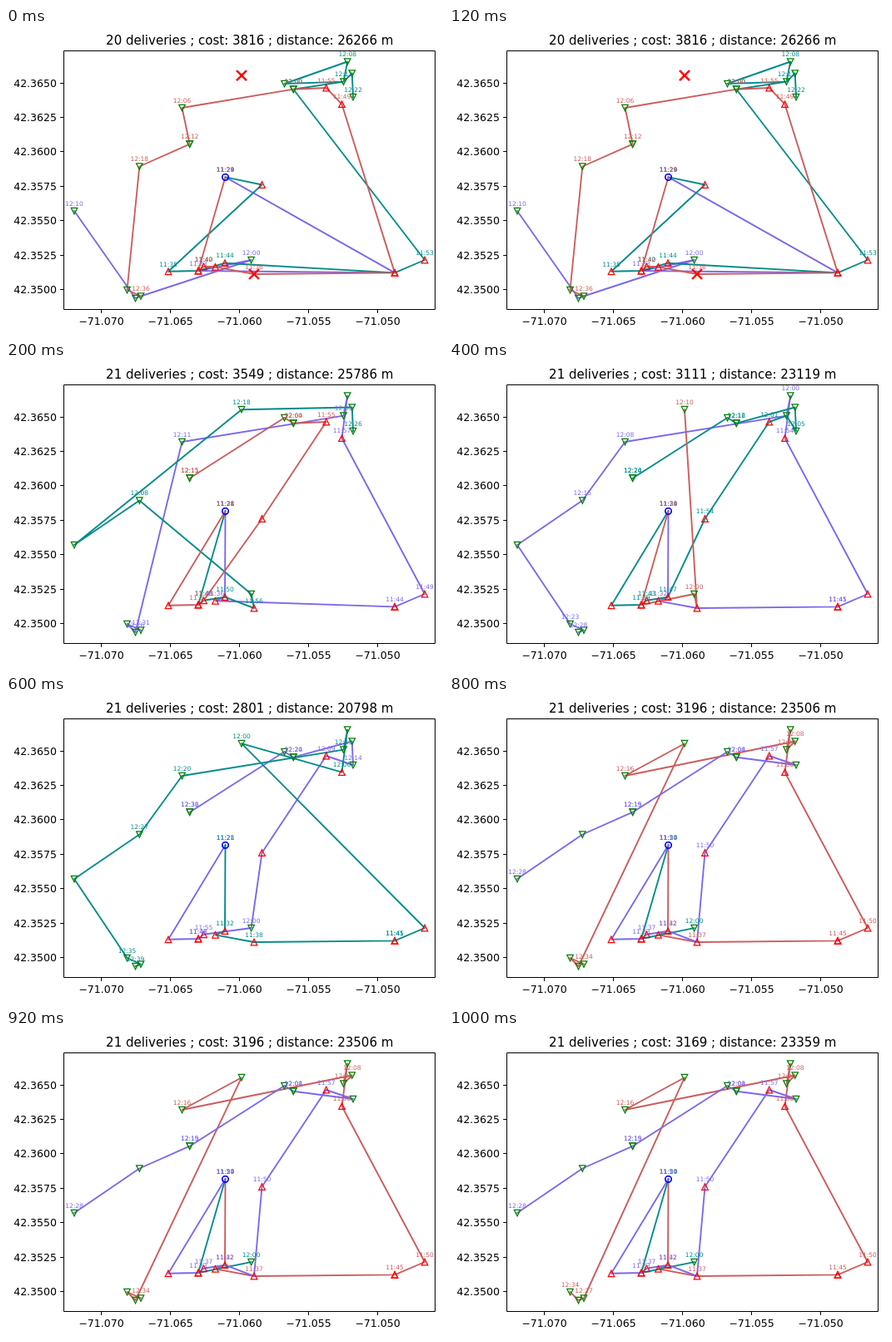
Animation, 525 px wide and 368 px high, one loop 1.2 s. Source, as an HTML page with a canvas:

```html
<!DOCTYPE html>
<html lang="en">
<head>
<meta charset="utf-8">
<title>Delivery routes</title>
<style>
html, body { margin: 0; width: 100%; height: 100%; overflow: hidden; background: #fff; }
canvas { display: block; width: 525px; height: 368px; }
</style>
</head>
<body>
<canvas id="plot"></canvas>
<script>
const W = 525, H = 368, STEP = 200;
const BOX = { l: 69.5, r: 515.5, t: 27.5, b: 338.5 };
const PURPLE = '#7b68ee', TEAL = '#008b8b', RED = '#cd5c5c';
const FONT = '"DejaVu Sans", sans-serif';

// o: depot, lower case: pickups, upper case: drop-offs
const STOPS = {
  o: [263.5, 179.3],
  a: [195, 292.8], b: [231, 292], c: [237.5, 286.8], d: [251.5, 287.3],
  e: [263, 282.7], f: [298, 296], g: [307.5, 188.5], h: [384.7, 72],
  i: [403.5, 91.7], j: [467, 294.4], k: [503, 279],
  A: [82, 220], B: [160.3, 166.5], C: [220.7, 139.7], D: [211.5, 96],
  E: [334.5, 67], F: [345.3, 73.7], G: [410.2, 40.5], H: [415.7, 54.5],
  I: [405.5, 64.6], J: [417, 83], K: [294.6, 279], L: [283, 57.2],
  M: [145.5, 315], N: [155.5, 325], O: [162, 322.5]
};

// each route: colour, stops in order, time labels
const PLANS = [
  { n: 20, cost: 3816, dist: 26266, missed: 'Lf', routes: [
    [PURPLE, 'ojbKONA', 'o11:24 b11:33 K12:00 A12:10'],
    [TEAL, 'ogabejkFIEGIHJ', 'o11:29 a11:35 c11:40 e11:44 k11:53 F12:00 G12:08 I12:13 J12:22'],
    [RED, 'obcdfjihFDCBMO', 'o11:29 c11:42 f11:36 i11:49 h11:55 F12:00 D12:06 C12:12 B12:18 O12:36']
  ] },
  { n: 21, cost: 3549, dist: 25786, routes: [
    [PURPLE, 'oedjkiGIDNMO', 'o11:31 d11:36 j11:44 k11:49 i11:57 I12:05 D12:11 N12:26 O12:31'],
    [TEAL, 'obcefKBALHJ', 'o11:28 c11:43 e11:50 f11:56 B12:08 L12:18 J12:26'],
    [RED, 'oabcghFEC', 'o11:24 b11:37 c11:46 h11:55 F12:00 F12:04 C12:11 C12:15']
  ] },
  { n: 21, cost: 3111, dist: 23119, routes: [
    [PURPLE, 'oedfjkiGIDBAMON', 'o11:28 d11:32 j11:41 j11:45 i11:54 G12:00 D12:08 B12:15 M12:23 N12:28'],
    [TEAL, 'oabceghIJHFEC', 'o11:34 b11:39 c11:43 e11:47 g11:54 h12:01 J12:05 F12:12 F12:16 C12:20 C12:24'],
    [RED, 'obKfL', 'o11:30 K12:00 L12:10']
  ] },
  { n: 21, cost: 2801, dist: 20798, routes: [
    [PURPLE, 'oabcKghJHFEC', 'o11:28 b11:42 b11:46 c11:55 K12:00 h12:09 J12:14 F12:20 F12:24 C12:32 C12:36'],
    [TEAL, 'oedfjkLiGIDBAMON', 'o11:21 e11:32 f11:38 j11:41 j11:45 L12:00 i12:06 I12:13 D12:20 B12:27 M12:35 N12:39']
  ] },
  { n: 21, cost: 3196, dist: 23506, routes: [
    [PURPLE, 'oabcefghJFECBA', 'o11:24 b11:33 c11:37 e11:42 g11:50 h11:57 F12:04 F12:08 C12:15 C12:19 A12:28'],
    [TEAL, 'obK', 'o11:50 K12:00'],
    [RED, 'oedfjkiGIHDLNMO', 'o11:27 e11:32 f11:37 j11:45 k11:50 i11:58 I12:03 H12:08 D12:16 O12:34']
  ] }
];

// the last plan only reorders the end of the red route
const prev = PLANS[4];
PLANS.push({ n: 21, cost: 3169, dist: 23359, routes: [
  [RED, 'oedfjkiGIHDLONM', prev.routes[2][2].replace('O12:34', 'O12:27 M12:34')],
  prev.routes[1], prev.routes[0]
] });
prev.routes.reverse();

const canvas = document.getElementById('plot');
const ctx = canvas.getContext('2d');
const dpr = window.devicePixelRatio || 1;
canvas.width = W * dpr;
canvas.height = H * dpr;
ctx.scale(dpr, dpr);

function text(str, x, y, size, color = '#000', align = 'center') {
  ctx.font = size + 'px ' + FONT;
  ctx.fillStyle = color;
  ctx.textAlign = align;
  ctx.fillText(str, x, y);
}

function line(points, color, width, closed) {
  ctx.beginPath();
  points.forEach(p => ctx.lineTo(p[0], p[1]));
  if (closed) ctx.closePath();
  ctx.strokeStyle = color;
  ctx.lineWidth = width;
  ctx.stroke();
}

function triangle([x, y], dir, color) {
  const r = 3.75;
  line([[x, y - r * dir], [x - r, y + r * dir], [x + r, y + r * dir]], color, 1.25, true);
}

function cross([x, y]) {
  const r = 6;
  line([[x - r, y - r], [x + r, y + r]], '#f00', 2.4);
  line([[x - r, y + r], [x + r, y - r]], '#f00', 2.4);
}

function marker(key) {
  const p = STOPS[key];
  if (key === 'o') {
    ctx.beginPath();
    ctx.arc(p[0], p[1], 3.75, 0, Math.PI * 2);
    ctx.strokeStyle = '#00f';
    ctx.lineWidth = 1.25;
    ctx.stroke();
  } else if (key < 'a') {
    triangle(p, -1, '#008000');
  } else {
    triangle(p, 1, '#f00');
  }
}

function drawAxes() {
  const { l, r, t, b } = BOX;
  ctx.lineJoin = 'miter';
  line([[l, t], [r, t], [r, b], [l, b]], '#000', 1, true);
  for (let i = 0; i < 5; i++) {
    const x = Math.floor(114.5 + i * 83) + 0.5;
    line([[x, b], [x, b + 4.4]], '#000', 1);
    text('\u2212' + (71.07 - i * 0.005).toFixed(3), x, 356.8, 12.5);
  }
  for (let i = 0; i < 7; i++) {
    const y = Math.floor(314.5 - i * 41.4) + 0.5;
    line([[l - 4.4, y], [l, y]], '#000', 1);
    text((42.35 + i * 0.0025).toFixed(4), l - 8.6, y + 4.6, 12.5, '#000', 'right');
  }
}

function drawPlan({ n, cost, dist, routes, missed = '' }) {
  ctx.fillStyle = '#fff';
  ctx.fillRect(0, 0, W, H);

  ctx.lineJoin = 'round';
  ctx.lineCap = 'square';
  for (const [color, path] of routes) line([...path].map(k => STOPS[k]), color, 1.875);

  ctx.lineJoin = 'miter';
  ctx.lineCap = 'butt';
  for (const key of Object.keys(STOPS).join('') + 'objFC') {
    if (!missed.includes(key)) marker(key);
  }
  for (const key of missed) cross(STOPS[key]);

  drawAxes();
  for (const [color, , labels] of routes) {
    for (const label of labels.split(' ')) {
      const [x, y] = STOPS[label[0]];
      text(label.slice(1), x, y - 6.3, 7.5, color);
    }
  }
  text(`${n} deliveries ; cost: ${cost} ; distance: ${dist} m`, 292.7, 20.3, 15);
}

let shown = -1;
function tick() {
  const index = Math.floor(performance.now() / STEP) % PLANS.length;
  if (index !== shown) drawPlan(PLANS[shown = index]);
  requestAnimationFrame(tick);
}
tick();
</script>
</body>
</html>
```
